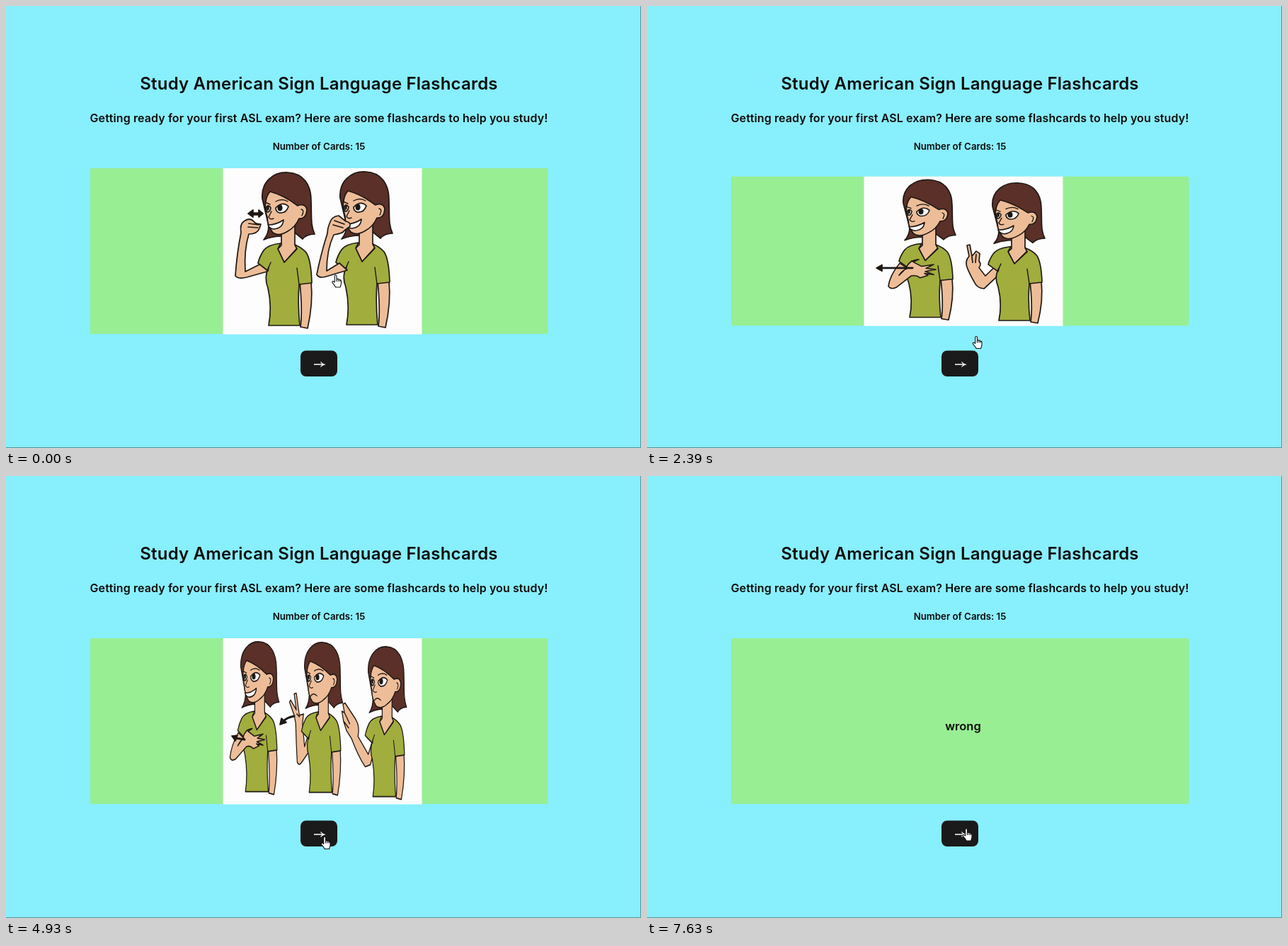
Recreate the animation shown at these times as an HTML page. Size 897 px wide and 624 px high, loop 8 s.

```html
<!DOCTYPE html>
<html lang="en">
<head>
<meta charset="utf-8">
<title>Flashcards</title>
<style>
  html, body { margin: 0; height: 100%; overflow: hidden; background: #88effd; }
  svg { display: block; width: 100%; height: 100%; }
  text { font-family: Inter, "Open Sans", sans-serif; font-weight: 600; text-anchor: middle; fill: #0b0b0b; }
  .art path, .art ellipse { stroke: #1e1814; stroke-width: 1.7; stroke-linejoin: round; stroke-linecap: round; }
  .art .skin { fill: #edbd98; }
  .art .hair { fill: #5a3028; }
  .art .shirt { fill: #a1ad3d; }
  .art .line { fill: none; stroke-width: 1.4; }
  .art .ink { fill: #1e1814; }
  .art .arrow { fill: none; stroke-width: 3; }
</style>
</head>
<body>
<svg viewBox="0 0 897 624">
  <rect width="897" height="624" fill="#88effd"/>
  <path d="M896.5 0V623.5H0" fill="none" stroke="#5f8f98"/>
  <text x="442" y="118" font-size="24" letter-spacing=".2">Study American Sign Language Flashcards</text>
  <text x="442" y="163.5" font-size="16" letter-spacing=".1">Getting ready for your first ASL exam? Here are some flashcards to help you study!</text>
  <text x="442" y="203" font-size="13.28">Number of Cards: 15</text>
  <g id="card">
    <rect id="face" x="119" y="229" width="646.5" height="234" rx="2"/>
    <text id="word" x="446.5" y="358.5" font-size="16.5"></text>
    <g id="picture" class="art">
      <rect x="306.5" y="229" width="281" height="234.5" fill="#fdfdfd"/>
      <g id="drawing"></g>
    </g>
  </g>
  <rect x="416" y="486.5" width="52" height="36.5" rx="8" fill="#1a1a1a"/>
  <path d="M435 506H449M444.5 502.5Q446 505 449.5 506Q446 507 444.5 509.5" fill="none" stroke="#fff" stroke-width="1.3"/>
  <path id="hand" fill="#fff" stroke="#111" stroke-width="1.1" stroke-linejoin="round"
    d="M4.2 11V2Q5.5 -.6 7 2V6.5Q8.5 5.6 9.4 7Q11 6.2 11.6 7.8Q13.4 7.4 13.5 9.5V13Q13 15.5 12 18H5.6Q4.5 15.5 1 11.6Q.3 9.2 2.4 9.6ZM7 7V10M9.4 7.5V10M11.6 8.3V10"/>
</svg>
<script>
const $ = id => document.getElementById(id);
const path = (cls, d) => `<path class="${cls}" d="${d}"/>`;

// Signing arms, in the coordinates of the leftmost figure
const arms = {
  away: 'M360 364L338 375Q336 345 343 322Q355 322 358 314L360 308Q352 308 350 304Q344 298 336 304Q330 308 332 320Q326 350 324 381Q328 386 340 383L372 374Z M343 307L357 309M342 312L356 313',
  mouth: 'M361 364L343 375Q343 345 353 324Q366 322 368 318L376 312Q377 306 370 305L360 297Q350 298 347 308Q344 315 344 322Q335 350 329 380Q332 386 342 383L372 374Z M354 304L368 309M352 310L366 314',
  chest: 'M357 366Q343 385 341 402Q344 408 352 404L373 386Q380 384 386 389L397 385L392 382L405 384L393 379L408 376L394 374L405 368L388 371L376 364L384 360Q370 361 366 374L356 385Q361 377 368 374Z',
  pinch: 'M366 366L352 381L343 368Q347 362 343 358L344 346L339 342L333 350L330 332L326 333L329 350Q322 358 327 370Q330 378 336 390Q340 400 350 401L374 376Z M333 351L334 360M339 347L338 360',
  lift: 'M370 366L362 385L358 352L360 338L352 340L346 308L342 309L346 332L335 318L333 321L342 340L345 352Q346 385 348 408Q352 414 358 406L378 384Z M347 338L352 342',
  push: 'M372 366L362 390L342 364Q346 350 338 340L317 316L313 318L316 330L311 328L314 342L320 356L330 368Q342 392 356 408L366 405L376 378Z M316 330L326 346M314 342L324 352'
};

const moods = {
  glad: `<path fill="#fff" d="M370 309Q382 309 392 302Q391 314 378 315Q372 314 370 309Z"/>`,
  sad: path('line', 'M373 313Q379 306 386 312')
};

function woman(dx, dy, arm, mood = 'glad', sx = 1, sy = 1) {
  const limb = path('skin', arms[arm]);
  const over = arm == 'chest' || arm == 'mouth';
  return `<g transform="translate(${dx} ${dy}) translate(361 235) scale(${sx} ${sy}) translate(-361 -235)">` +
    path('hair', 'M362 272C360 248 378 234 398 235C420 236 431 252 431 275C432 300 430 308 436 322Q425 322 419 329L408 320L390 325Q376 325 364 330Q371 322 371 310Z') +
    (over ? '' : limb) +
    path('skin', 'M415 390L431 389Q434 420 426 455L416 453Q419 430 415 390Z') +
    path('skin', 'M389 312V338L384 343L393 362L411 342L408 336V310Z') +
    path('shirt', 'M388 335Q370 337 364 345Q358 354 356 363L370 374L371 369Q364 383 370 398Q376 425 371 451H415Q412 420 414 393L432 391Q431 358 424 348Q418 341 408 337L411 343L393 362L384 343Z') +
    path('line', 'M371 369L374 362M414 393L411 370') +
    path('skin', 'M367 276Q368 268 373 262Q392 267 412 282Q422 278 425 287Q424 301 414 300Q409 312 398 318Q385 326 377 320Q369 310 369 298Q365 286 367 276Z') +
    path('line', 'M417 287Q422 288 418 296M375 290L371 298Q373 302 378 300M366 277L373 280M381 276Q390 271 398 276') +
    '<path fill="#fff" d="M381 285Q391 275 399 283Q396 293 386 292Q381 290 381 285ZM367 285Q371 279 374 285Q373 291 369 291Z"/>' +
    '<ellipse class="ink" cx="387" cy="285" rx="2.7" ry="3.6"/><ellipse class="ink" cx="370" cy="285" rx="1" ry="2.8"/>' +
    moods[mood] + (over ? limb : '') + '</g>';
}

const deck = {
  'food': woman(0, 0, 'away') + woman(110, -1, 'mouth') +
    path('ink', 'M342 293L349 288V292H357V288L363 293L357 298V295H349V298Z'),
  'like': woman(0, -1, 'chest') + woman(126, 4, 'pinch') +
    path('arrow', 'M375 372.5H328') + path('ink', 'M324 372.5L332 367.5V377.5Z'),
  "don't like": woman(-30, -1, 'chest', 'glad', .73, .98) + woman(60, 0, 'lift', 'sad', .73, .98) +
    woman(150, 6, 'push', 'sad', .73, .98) +
    path('arrow', 'M337 372L324 370M407 339Q396 341 391 347') +
    path('ink', 'M319 367L327 366L324 374ZM387 351L389 342L396 348Z'),
  'together': woman(0, 0, 'chest') + woman(118, 0, 'chest'),
  'how are you': '', 'wrong': ''
};

// [time, word, picture side up, height while turning]
const turns = [
  [0, 'food', 1, 1], [900, 'food', 0, 1], [1610, 'like', 0, 1],
  [2270, 'like', 0, .8], [2390, 'like', 1, .9], [2540, 'like', 1, 1],
  [3630, "don't like", 0, .7], [3760, "don't like", 0, 1],
  [4650, "don't like", 1, .6], [4810, "don't like", 1, 1],
  [5210, 'together', 0, .7], [5330, 'together', 0, 1],
  [6150, 'together', 1, .7], [6270, 'together', 1, 1],
  [6870, 'how are you', 0, 1], [7630, 'wrong', 0, 1]
];

// [time, left, top] of the pointer
const moves = [
  [0, 460, 379], [1050, 457, 415], [1180, 448, 479], [1330, 443, 497],
  [2150, 457, 461], [2270, 460, 450], [2390, 459.5, 465.5], [2540, 456, 490],
  [2660, 452, 510], [2790, 451, 513], [4140, 446, 508.5], [4290, 450, 499],
  [4410, 456, 475], [4530, 460, 446.5], [4810, 455, 484], [4930, 444.5, 508.5],
  [5880, 455, 470], [6000, 460, 437.5], [6270, 446, 498], [6420, 448, 500],
  [6570, 447, 501], [7240, 448, 492], [7360, 447, 484], [7480, 448, 490],
  [7630, 445.5, 497]
];

const at = (list, t) => list.findLast(row => row[0] <= t);
let shown;

function draw(now) {
  const t = now % 8000;
  const turn = at(turns, t), [, x, y] = at(moves, t);
  $('hand').setAttribute('transform', `translate(${x} ${y})`);
  if (turn !== shown) {
    const [, word, pic, scale] = shown = turn;
    $('face').setAttribute('fill', word == 'together' ? '#f9a220' : '#98ee93');
    $('word').textContent = pic ? '' : word;
    $('picture').style.display = pic ? '' : 'none';
    $('drawing').innerHTML = deck[word];
    $('card').setAttribute('transform', `translate(0 346) scale(1 ${scale}) translate(0 -346)`);
  }
  requestAnimationFrame(draw);
}
draw(0);
</script>
</body>
</html>
```
